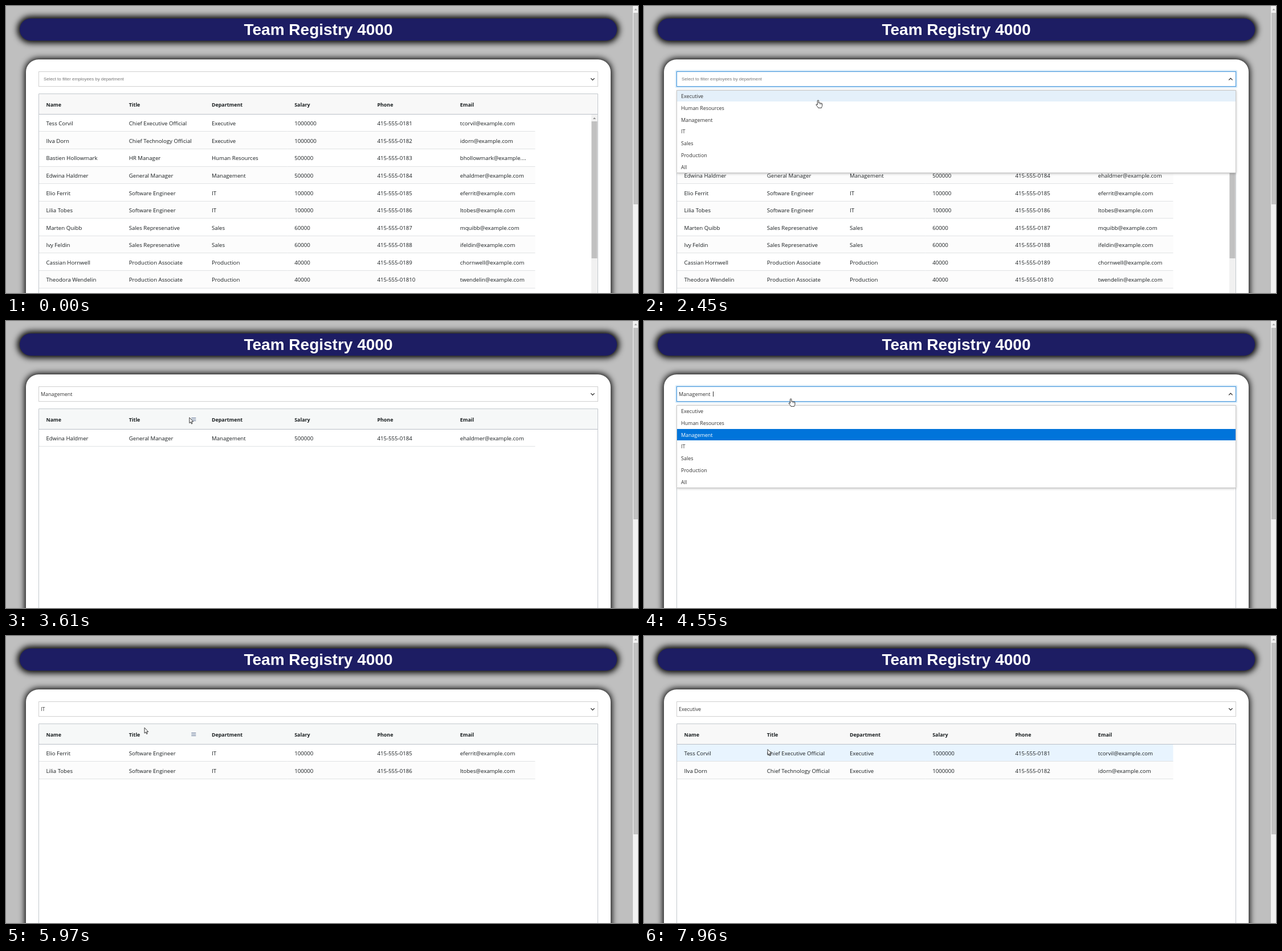
Animation of 1109x505 px, one loop 8 s. Source, as an HTML page with a canvas:

```html
<!DOCTYPE html>
<html lang="en">
<head>
<meta charset="utf-8">
<title>Team Registry 4000</title>
<style>
  html, body { margin: 0; width: 100%; height: 100%; overflow: hidden; background: #bfbfbf; }
  #view { position: relative; width: 100%; height: 100%; overflow: hidden; contain: strict; }
  .panel { position: absolute; }
  #bar { left: 24px; top: 22px; width: 1048px; height: 39px; border-radius: 20px; background: #1d1d63; box-shadow: 0 0 11px 4px #000; }
  #card { left: 35px; top: 93.5px; width: 1026px; height: 460px; border-radius: 22px; background: #fff; box-shadow: 0 0 11px 2px #000; }
  canvas { position: absolute; left: 0; top: 0; display: block; }
</style>
</head>
<body>
<div id="view">
  <div id="bar" class="panel"></div>
  <div id="card" class="panel"></div>
  <canvas id="stage" width="1109" height="505"></canvas>
</div>
<script>
const ctx = document.getElementById('stage').getContext('2d');
const LOOP = 8000;
const SANS = '"Open Sans", "Noto Sans", sans-serif';
const ARIAL = '"Liberation Sans", Arial, sans-serif';
const INK = '#181d1f', LINE = '#babfc7';
const LEFT = 57.5, RIGHT = 1038.5, ROWS_RIGHT = 928.5;
const HEAD_TOP = 154.5, ROWS_TOP = 190.5, ROW_H = 30.58, COL_W = 145.25;
const LIST_TOP = 148.4, ITEM_H = 20.75;

const HEADS = ['Name', 'Title', 'Department', 'Salary', 'Phone', 'Email'];
const OPTIONS = ['Executive', 'Human Resources', 'Management', 'IT', 'Sales', 'Production', 'All'];
const STAFF = [
  ['Tess Corvil', 'Chief Executive Official', 'Executive', 1000000],
  ['Ilva Dorn', 'Chief Technology Official', 'Executive', 1000000],
  ['Bastien Hollowmark', 'HR Manager', 'Human Resources', 500000],
  ['Edwina Haldmer', 'General Manager', 'Management', 500000],
  ['Elio Ferrit', 'Software Engineer', 'IT', 100000],
  ['Lilia Tobes', 'Software Engineer', 'IT', 100000],
  ['Marten Quibb', 'Sales Represenative', 'Sales', 60000],
  ['Ivy Feldin', 'Sales Represenative', 'Sales', 60000],
  ['Cassian Hornwell', 'Production Associate', 'Production', 40000],
  ['Theodora Wendelin', 'Production Associate', 'Production', 40000]
].map((row, i) => {
  const [first, last] = row[0].toLowerCase().split(' ');
  const user = first[0] + last;
  const mail = user + (user.length > 10 ? '@example....' : '@example.com');
  return [...row, '415-555-018' + (i + 1), mail];
});

// Pointer moves: start, end, number of steps, then [progress, x, y] stops
const MOVES = [
  [110, 420, 5, [[0, 1160, 505], [0.2, 1054, 488], [1, 600, 429]]],
  [640, 1280, 9, [[0, 600, 429], [1, 350, 118.5]]],
  [2290, 3050, 10, [[0, 350, 118.5], [0.2, 305.5, 166], [1, 309, 195]]],
  [3530, 4320, 11, [[0, 309, 195], [0.18, 322, 170], [0.6, 290, 134], [1, 262, 120]]],
  [4550, 5100, 8, [[0, 262, 120], [0.75, 236, 222], [1, 235, 222]]],
  [5340, 5340, 1, [[0, 235, 222], [1, 227.5, 217]]],
  [5820, 6505, 9, [[0, 227.5, 217], [0.22, 243, 161.5], [0.6, 250, 134], [1, 248, 125]]],
  [6640, 7350, 10, [[0, 248, 125], [1, 224, 160]]],
  [7570, 7960, 6, [[0, 224, 160], [1, 217, 199.5]]]
];

// Focus, list opening, choice and blur times of each visit to the select
const VISITS = [
  [1580, 1740, 3220, 3300, 'Management'],
  [4400, 4550, 5500, 5570, 'IT'],
  [6590, 6640, 7500, 7570, 'Executive']
];

const HAND = new Path2D('M-1.2 8V1A1.2 1.2 0 0 1 1.2 1V5C1.2 4 3.4 4 3.4 5.3C3.4 4.4 5.4 4.5 5.4 5.7' +
  'C5.4 4.9 7.2 5 7.2 6.2V9.5C7.2 11 6 11.5 6 13.3H.2C.2 12 -3 9.3 -3.4 8C-3.6 6.6 -2 6.4 -1.2 8Z');
const ARROW = new Path2D('M0 0V9.8L2.2 7.8L3.7 11.2L5.1 10.6L3.7 7.2H6.7Z');

function pointer(t) {
  if (t < MOVES[0][0]) return { x: -99, y: -99 };
  const [start, end, n, stops] = MOVES.filter(m => t >= m[0]).pop();
  const gap = n > 1 ? (end - start) / (n - 1) : 1;
  const p = Math.min(n, Math.floor((t - start) / gap + 1e-6) + 1) / n;
  let i = 1;
  while (i < stops.length - 1 && p > stops[i][0]) i++;
  const [p0, x0, y0] = stops[i - 1], [p1, x1, y1] = stops[i];
  const k = (p - p0) / (p1 - p0);
  return { x: x0 + (x1 - x0) * k, y: y0 + (y1 - y0) * k };
}

function state(t) {
  const s = { focus: false, open: false, value: '', ...pointer(t) };
  for (const [focus, open, pick, blur, value] of VISITS) {
    if (t >= focus && t < blur) s.focus = true;
    if (t >= open && t < pick) s.open = true;
    if (t >= pick) s.value = value;
  }
  return s;
}

function text(str, x, y, font, color = INK) {
  ctx.font = font;
  ctx.fillStyle = color;
  ctx.fillText(str, x, y);
}

function box(x, y, w, h, color) {
  ctx.fillStyle = color;
  ctx.fillRect(x, y, w, h);
}

function frame(x, y, w, h, color, width = 1) {
  ctx.strokeStyle = color;
  ctx.lineWidth = width;
  ctx.strokeRect(x, y, w, h);
}

function line(points, color, width = 1) {
  ctx.beginPath();
  points.forEach(([x, y]) => ctx.lineTo(x, y));
  ctx.strokeStyle = color;
  ctx.lineWidth = width;
  ctx.stroke();
}

function upArrow(x, y, color) {
  ctx.beginPath();
  ctx.moveTo(x - 2.5, y + 1.5);
  ctx.lineTo(x, y - 1.5);
  ctx.lineTo(x + 2.5, y + 1.5);
  ctx.fillStyle = color;
  ctx.fill();
}

function drawPage() {
  ctx.textAlign = 'center';
  text('Team Registry 4000', 548, 51, 'bold 28px ' + ARIAL, '#fff');
  ctx.textAlign = 'left';
  box(1100, 0, 9, 505, '#f1f1f1');
  box(1101, 12, 8, 337, '#c1c1c1');
  upArrow(1105, 6, '#a3a3a3');
}

function drawSelect(s) {
  const hover = s.y > 115 && s.y < 142;
  const w = RIGHT - LEFT;
  if (s.focus) {
    ctx.lineJoin = 'round';
    frame(LEFT, 115.5, w, 26, 'rgba(0,120,215,.12)', 6);
    frame(LEFT, 115.5, w, 26, 'rgba(0,120,215,.15)', 3);
    ctx.lineJoin = 'miter';
  }
  box(LEFT, 116, w, 25, '#fff');
  frame(LEFT, 115.5, w, 26, s.focus ? '#4a98dc' : hover ? '#5598d6' : '#d0d0d0');
  if (s.value) text(s.value, 61, 132, '8.95px ' + SANS, '#333');
  else text('Select to filter employees by department', 66, 131, '7.9px ' + ARIAL, '#777');
  if (s.focus && s.value) {
    const x = Math.round(61 + ctx.measureText(s.value).width + 5) + 0.5;
    line([[x, 124], [x, 133]], '#333');
  }
  const d = s.open ? -1.6 : 1.6;
  line([[1026.2, 128.8 - d], [1029.4, 128.8 + d], [1032.6, 128.8 - d]], '#222', 1.2);
}

function drawGrid(s) {
  const inGrid = !s.open && s.x > LEFT && s.x < RIGHT;
  const onHead = inGrid && s.y > HEAD_TOP && s.y < ROWS_TOP;
  box(LEFT, HEAD_TOP, RIGHT - LEFT, 36, onHead ? '#f6f8f8' : '#f8f8f8');

  const rows = s.value ? STAFF.filter(r => r[2] === s.value) : STAFF;
  const over = inGrid && s.x < ROWS_RIGHT ? Math.floor((s.y - ROWS_TOP) / ROW_H) : -1;
  rows.forEach((row, i) => {
    const top = Math.round(ROWS_TOP + ROW_H * i + 0.3);
    const bottom = Math.round(ROWS_TOP + ROW_H * (i + 1) + 0.3);
    box(58, top, ROWS_RIGHT - 58, bottom - top, i === over ? '#e8f4fe' : i % 2 ? '#fcfcfc' : '#fff');
    line([[58, bottom - 0.5], [ROWS_RIGHT, bottom - 0.5]], '#e0e2e4');
    const base = Math.round(210.2 + ROW_H * i);
    row.forEach((cell, c) => text(cell, 70.5 + COL_W * c, base, '9.65px ' + SANS));
  });

  HEADS.forEach((h, c) => text(h, 70.5 + COL_W * c, 177, 'bold 8.85px ' + SANS));
  if (onHead) {
    const col = Math.floor((s.x - 58) / COL_W);
    const x = 58 + COL_W * (col + 1) - 23.2;
    if (col < HEADS.length) [170.5, 173, 175.5].forEach(y => line([[x, y], [x + 8, y]], '#5b6f91', 0.9));
  }
  if (!s.value) {
    box(1027, 191, 11, 314, '#f1f1f1');
    box(1027.5, 203, 10, 241, '#c1c1c1');
    upArrow(1032.5, 197.5, '#8d8d8d');
  }
  line([[LEFT, 190.5], [RIGHT, 190.5]], LINE);
  line([[LEFT, 510], [LEFT, HEAD_TOP], [RIGHT, HEAD_TOP], [RIGHT, 510]], '#c3c8cd');
}

function drawList(s) {
  ctx.save();
  ctx.shadowColor = 'rgba(0,0,0,.25)';
  ctx.shadowBlur = 4;
  ctx.shadowOffsetY = 1;
  box(LEFT, 148, RIGHT - LEFT + 0.5, 146, '#fff');
  ctx.restore();
  const over = Math.floor((s.y - LIST_TOP) / ITEM_H);
  OPTIONS.forEach((name, i) => {
    const top = Math.round(LIST_TOP + ITEM_H * i);
    const chosen = name === s.value;
    if (chosen || i === over) box(58, top, RIGHT - 58, 20, chosen ? '#0074da' : '#e4f0fa');
    text(name, 65, Math.round(162 + ITEM_H * i), '8.95px ' + SANS, chosen ? '#fff' : '#333');
  });
  frame(LEFT, 148.5, RIGHT - LEFT, 145, '#c8c8c8');
}

function drawPointer(s) {
  const hand = s.open || (s.y > 115 && s.y < 142);
  const shape = hand ? HAND : ARROW;
  ctx.save();
  ctx.translate(s.x, s.y);
  ctx.fillStyle = '#fff';
  ctx.fill(shape);
  ctx.strokeStyle = '#222';
  ctx.lineWidth = 0.9;
  ctx.stroke(shape);
  if (hand) [3.4, 5.4].forEach(x => line([[x, 5.5], [x, 7.5]], '#444', 0.7));
  ctx.restore();
}

function draw(t) {
  const s = state(t);
  ctx.clearRect(0, 0, 1109, 505);
  drawPage();
  drawGrid(s);
  drawSelect(s);
  if (s.open) drawList(s);
  drawPointer(s);
}

const begin = performance.now();
function tick() {
  draw((performance.now() - begin) % LOOP);
  requestAnimationFrame(tick);
}
tick();
</script>
</body>
</html>
```
